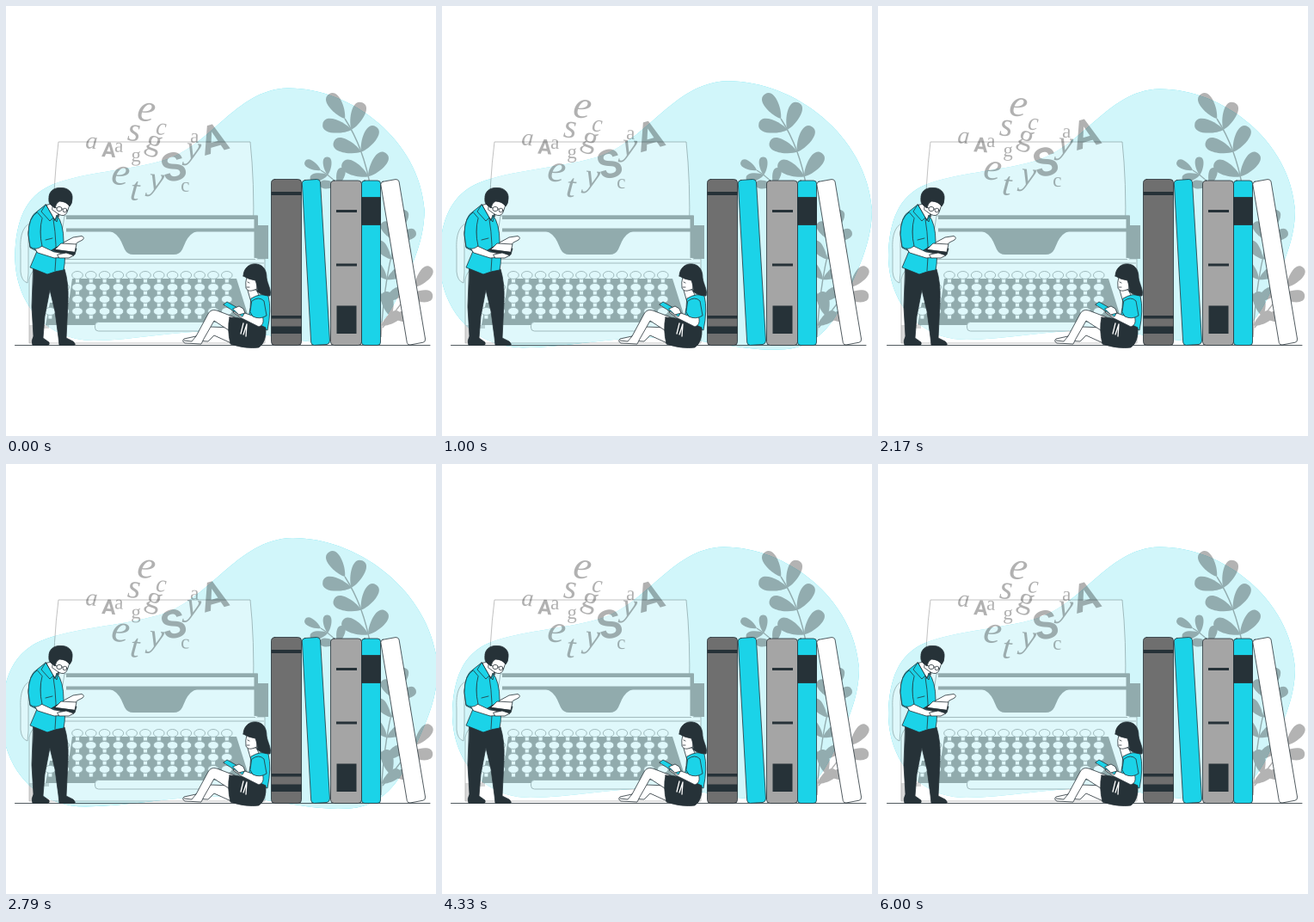
Write an HTML page that moves like this. It is 500 px wide and 500 px high and loops after 6.04 s.

```html
<!DOCTYPE html>
<html lang="en">
<head>
<meta charset="utf-8">
<title>Readers</title>
<style>
  html, body { margin: 0; width: 100%; height: 100%; overflow: hidden; background: #fff; }
  svg { display: block; width: 100%; height: 100%; }
  .line { stroke: #263238; stroke-width: .8; stroke-linejoin: round; stroke-linecap: round; }
  .cyan { fill: #1bd3e8; }
  .dark { fill: #263238; }
  .white { fill: #fff; }
  .none { fill: none; }
  text { text-anchor: middle; font-family: "Liberation Serif", serif; }
  .italic { font-style: italic; }
  .bold { font-family: Roboto, sans-serif; font-weight: 600; font-stretch: condensed; }
</style>
</head>
<body>
<svg viewBox="0 0 500 500">
  <defs>
    <path id="shape" d="M12 290C13 250 24 221 55 208C90 194 140 192 180 181C238 166 266 98 327 96.500C400 96 479 156 485 237C485 275 468 306 456 333C443 362 425 387 390 390C345 393 310 379 255 377C200 376 150 388 103 388C48 388 12 345 12 290Z"/>
  </defs>

  <g id="blob">
    <use href="#shape" class="cyan"/>
    <use href="#shape" class="white" fill-opacity=".8"/>
  </g>

  <g id="plant" opacity=".3"></g>

  <g id="typewriter" opacity=".3" stroke="#000" stroke-width=".8">
    <path class="white" d="M61 158H284Q289 205 287.500 262H55Q55 205 61 158Z"/>
    <path class="white" d="M32 251C20 254 16 266 17 284V309Q18 320 25 322L26 310V262Z"/>
    <path class="white" d="M68 244H292V294H301V392H27V318Q30 300 60 296Z"/>
    <path d="M70 243.500H293V293H288.500V262.500H70V258.500H288.500V248H70Z" stroke="none"/>
    <path d="M293 255H305V294H293Z" stroke="none"/>
    <path d="M121 262H222Q214 264 209 274L205 283Q202 289 195 289H148Q141 289 138 283L134 274Q129 264 121 262Z" stroke="none"/>
    <path class="none" d="M66 294.500H290M60 299H300"/>
    <path d="M77 317H268L285 371H46L51 345H73Z" stroke="none"/>
    <g id="keys" class="white"></g>
    <rect class="white" x="103.500" y="367.500" width="150" height="10.500" rx="4"/>
    <path d="M27 371H50V375H36V392H27Z" stroke="none" opacity=".5"/>
  </g>

  <g id="letters" opacity=".3"></g>

  <path class="line none" d="M10.500 394.500H493"/>

  <g id="books" class="line">
    <rect x="308.500" y="201.500" width="35" height="193" rx="4" fill="#6f6f6f"/>
    <path class="dark" stroke="none" d="M308.500 216H343.500V220H308.500ZM308.500 360H343.500V363.500H308.500ZM308.500 372.500H343.500V381H308.500Z"/>
    <path class="cyan" d="M347.500 202.500L361.500 201.500Q365 201.500 365.500 205L376.500 389Q376.500 393 373 393.500L358.500 394.500Q355 394.500 354.700 391L344.300 206Q344.200 203 347.500 202.500Z"/>
    <rect x="377.500" y="203" width="36" height="191.500" rx="4" fill="#a5a5a5"/>
    <path class="dark" stroke="none" d="M384 237H408V240H384ZM384 299.500H408V302.500H384ZM384.500 348.500H407.500V381H384.500Z"/>
    <rect class="cyan" x="413.500" y="203" width="22" height="191.500" rx="3.500"/>
    <path class="dark" d="M414 222.500H435.500V254.500H414Z"/>
    <path class="white" d="M438 204.300L453 201.600Q456 201.300 457 204L487.500 387Q488 390.500 485 391.200L470 394Q467 394.500 466.300 391.500L435.800 207.500Q435.600 205 438 204.300Z"/>
  </g>

  <g id="man" class="line">
    <path class="dark" d="M32 303L68 306Q73 322 72 344L70 386L78 390Q82 394 79 394.500H62L61 385L57 355L51 330L45 361L43 386L50 391Q51 394.500 48 394.500H31Q29 390 32 384L30 350Z"/>
    <path class="white" d="M48 231L55 230L62 244L57 250L47 240Z"/>
    <path class="white" d="M55 228Q62 223 74 231L71 240Q68 246 61 242L54 237Z"/>
    <path class="dark" d="M50 224C49 216 56 210.500 64 211.500C72 211 78 217 77 224Q77 230 74 233Q70 227 62 227Q58 229 57 235L53 232Q49 229 50 224Z"/>
    <g class="none">
      <ellipse cx="62" cy="236" rx="3.200" ry="2.600"/>
      <ellipse cx="68.500" cy="237.500" rx="2.400" ry="2.300"/>
      <path d="M56 234L59 235"/>
    </g>
    <path class="cyan" d="M46 231L36 239Q27 244 26 264L28 281L36 285L28 304Q38 308 48 312Q58 308 67 307Q70 293 67 274Q67 253 59 243L57 249Z"/>
    <path class="cyan" d="M46 231L41 239L51 250L55 246L59 251L61 242L57 249Z"/>
    <path class="none" d="M55 248Q60 277 57 308M40 253Q39 268 41 280M46 272L54 270"/>
    <path class="white" d="M33 281L41 279L56 286L71 287Q75 289 72 292L56 293L37 287Z"/>
    <path class="cyan" d="M36 240Q26 246 26 266L28 280Q35 285 42 279Q38 262 42 247Z"/>
    <path class="white" d="M67 275L78 269L88 267.500Q92 269 89 272L83 275L79 280L68 280Z"/>
    <path class="dark" d="M53 284L63 278L82 282L80 289L76 291Z"/>
    <path class="white" d="M57 283L64 276L82 277L80 286Z"/>
    <path class="white" d="M60 289L70 287L79 290L73 293H62Z"/>
  </g>

  <g id="girl" class="line">
    <path class="white" d="M262 374L237 373Q231 375 226 382L217 389L235 390L242 383L264 393Z"/>
    <path class="white" d="M266 362L245 354Q238 352 235 358L221 384L207 387Q204 390 208 392L227 393L230 387L242 366L262 379Z"/>
    <path class="none" d="M207 389L216 390L221 384"/>
    <path class="white" d="M281 329L291 330L295 338L285 343Z"/>
    <path class="cyan" d="M285 340Q297 333 305 337Q309 353 304 377L281 369L284 351Z"/>
    <path class="dark" d="M260 362Q280 362 302 374Q303 391 294 397Q279 399 261 393Q257 376 260 362Z"/>
    <path class="none" stroke-width="1.300" style="stroke:#fff" d="M276 369L273 381M280 370L276 382M280 370L279 384"/>
    <path class="white" d="M280 315Q278 321 279 328Q281 332 286 331L292 329L291 318Z"/>
    <path class="dark" d="M276 314C276 305 283 299 291 300C300 301 303 308 303 316C304 324 309 330 307 337Q298 337 292 332Q293 325 290 319Q282 318 276 314Z"/>
    <path class="none" d="M281 321L283 322M280 327L283 327"/>
    <path class="white" d="M286 354L289 361L272 355L267 353L264 356L274 363L294 373Q300 371 299 364L297 353Z"/>
    <path class="cyan" d="M286 343Q294 337 300 343L303 360Q295 365 287 361L284 356Z"/>
    <path class="cyan" d="M253 347L257 344L278 356L275 361Z"/>
    <path class="white" d="M264 352L271 349L276 352L278 357L271 359Z"/>
  </g>
</svg>

<script>
const $ = id => document.getElementById(id);
const add = (parent, tag, attrs, text = "") => {
  const el = document.createElementNS("http://www.w3.org/2000/svg", tag);
  for (const name in attrs) el.setAttribute(name, attrs[name]);
  el.textContent = text;
  $(parent).append(el);
};

function leaf(x, y, tilt, size) {
  const w = size * .38;
  add("plant", "path", {
    transform: `translate(${x} ${y}) rotate(${tilt})`,
    d: `M0 0C${-w * .5} ${-size * .2} ${-w * 1.1} ${-size} 0 ${-size}S${w * .5} ${-size * .2} 0 0Z`
  });
}

// A curved stem with pairs of leaves along it and one leaf at the tip
function sprig([x0, y0], [cx, cy], [x1, y1], pairs, size) {
  add("plant", "path", { d: `M${x0} ${y0}Q${cx} ${cy} ${x1} ${y1}`, fill: "none", stroke: "#000", "stroke-width": 1.4 });
  for (let i = 0; i <= pairs; i++) {
    const t = Math.min((i + .45) / pairs, 1), s = 1 - t;
    const x = s * s * x0 + 2 * s * t * cx + t * t * x1;
    const y = s * s * y0 + 2 * s * t * cy + t * t * y1;
    const dx = s * (cx - x0) + t * (x1 - cx), dy = s * (cy - y0) + t * (y1 - cy);
    const tilt = Math.atan2(dx, -dy) * 180 / Math.PI;
    for (const side of i < pairs ? [-50, 50] : [0]) leaf(x, y, tilt + side, size);
  }
}
sprig([424, 212], [416, 165], [394, 131], 3, 34);
sprig([390, 215], [382, 200], [366, 191], 2, 21);
sprig([436, 385], [440, 310], [456, 262], 5, 26);
sprig([438, 374], [460, 345], [475, 327], 2, 30);

// Keyboard: one grid whose lower rows reach further left
for (let row = 0; row < 4; row++) {
  for (let col = -Math.ceil(row / 2); col < 12; col++) {
    const x = 83 + col * 15.8, y = 313 + row * 14;
    add("keys", "rect", { x: x - 2.5, y: y + 3, width: 5, height: 6, rx: 1 });
    add("keys", "ellipse", { cx: x, cy: y, rx: 6.3, ry: 4.5 });
  }
}

// Letters of one style: each is glyph, centre x, baseline
function scatter(style, size, tilt, items) {
  for (const item of items.split(", ")) {
    const [glyph, x, y] = item.split(" ");
    add("letters", "text", { class: style, "font-size": size, transform: `translate(${x} ${y}) rotate(${tilt})` }, glyph);
  }
}
scatter("italic", 28, 4, "a 99 166, c 180 150");
scatter("italic", 39, 5, "s 148 157, y 217 178, t 149 226, y 174 214");
scatter("italic", 46, 11, "e 161 134, e 131 208");
scatter("roman", 23, 2, "a 131 170, g 151 181, a 219 159, c 208 216");
scatter("roman", 36, 20, "g 169 168");
scatter("bold", 24, 4, "A 119 176");
scatter("bold", 46, -16, "A 246 170, S 199 203");

const LOOP = 6040, LEAD = 40;
const bump = (t, from, peak, to) =>
  Math.max(0, Math.min((t - from) / (peak - from), (to - t) / (to - peak)));

function draw(now) {
  const t = Math.min(now % LOOP + LEAD, LOOP);
  const scale = 1 + .1 * (bump(t, 0, 600, 1800) + bump(t, 2400, 3000, 3600));
  const rise = 6.5 * bump(t % 1500, 0, 750, 1500);
  $("blob").setAttribute("transform", `translate(248.5 243.5) scale(${scale}) translate(-248.5 -243.5)`);
  $("letters").setAttribute("transform", `translate(0 ${-rise})`);
}

const start = performance.now();
function tick() {
  draw(performance.now() - start);
  requestAnimationFrame(tick);
}
tick();
</script>
</body>
</html>
```
